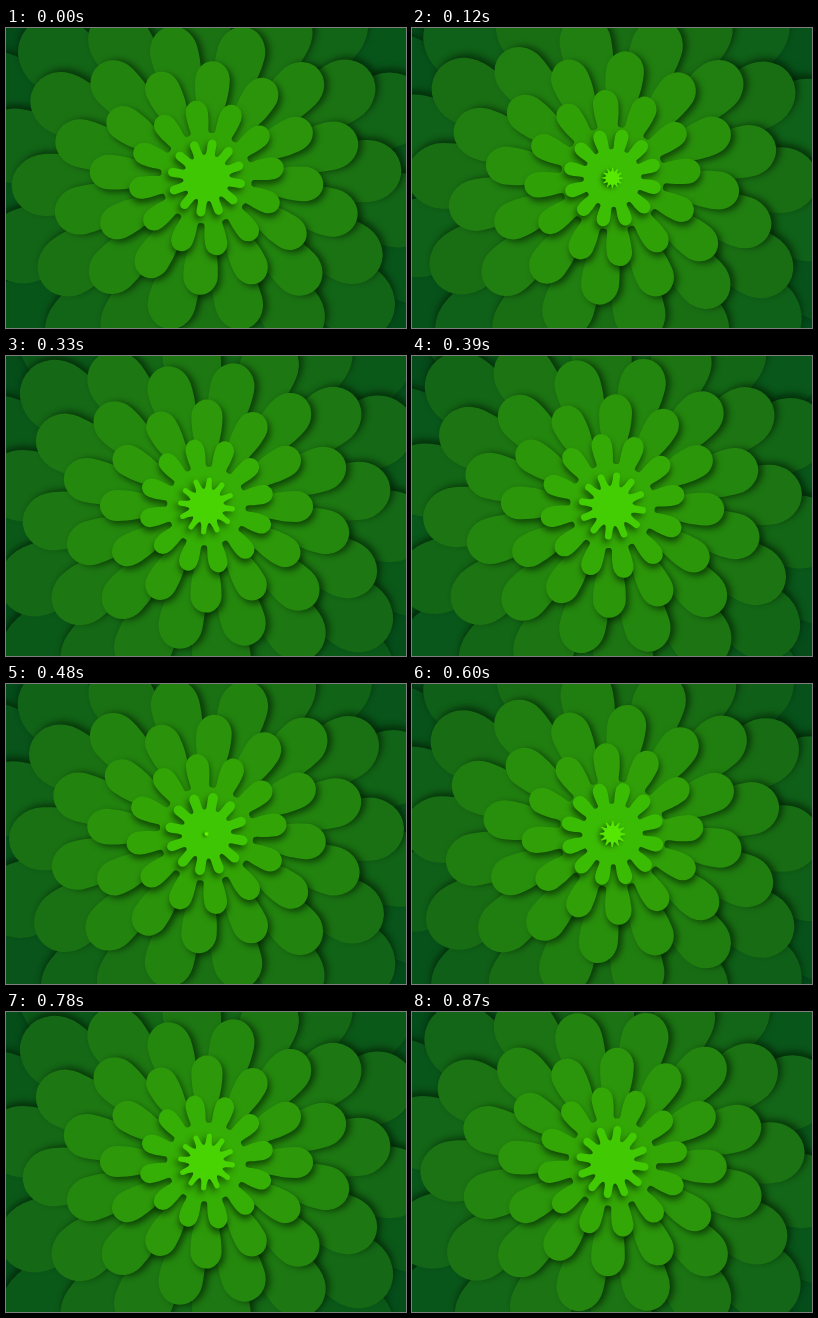
Animation of 400 by 300 pixels, one loop 900 ms. Source, as an HTML page with a canvas:

```html
<!DOCTYPE html>
<html lang="en">
<head>
<meta charset="utf-8">
<title>Blooming flower</title>
<style>
  html, body { margin: 0; width: 100%; height: 100%; overflow: hidden; background: #044b1a; }
  canvas { display: block; width: 400px; height: 300px; }
</style>
</head>
<body>
<canvas id="stage" width="400" height="300"></canvas>
<script>
const ctx = document.getElementById('stage').getContext('2d');
const LOOP = 900, STEP = 30;
const SPAWN = 450;            // ms between two new flowers
const LAYERS = 9, PETALS = 12;
const GROWTH = 39;            // radius gained per spawn interval
const TURN = 12;              // degrees turned per spawn interval
const START = -2.5;           // angle at birth
const rad = deg => deg * Math.PI / 180;

// Colour at age 0, 1, 2 ... spawn intervals
const SHADES = [
  [96, 246, 2], [63, 199, 3], [50, 165, 6], [43, 148, 11], [34, 132, 15],
  [27, 114, 19], [18, 100, 23], [8, 85, 26], [4, 75, 26], [3, 70, 25]
];

function shade(age) {
  const i = Math.min(Math.floor(age), SHADES.length - 2);
  const f = Math.min(age - i, 1);
  const mix = SHADES[i].map((c, n) => Math.round(c + (SHADES[i + 1][n] - c) * f));
  return `rgb(${mix})`;
}

// Young flowers are spiky stars, older ones have round, club-like petals
function flower(r, turn) {
  const half = Math.PI / PETALS;
  const grown = Math.min(1, r / 50);
  const k = r * (0.03 + 0.1 * grown + 0.03 * Math.min(1, r / 200));
  const c = r - k * 1.1;
  const notch = r * (0.64 - 0.06 * grown), bend = 0.075 * r * grown;
  const nx = notch * Math.cos(half), ny = notch * Math.sin(half);
  const bx = nx + bend * Math.sin(half), by = ny - bend * Math.cos(half);
  const sx = c - r * (0.1 + 0.12 * grown);
  const path = new Path2D();
  for (let i = 0; i < PETALS; i++) {
    const a = turn + i * 2 * half, cos = Math.cos(a), sin = Math.sin(a);
    const at = (x, y) => [x * cos - y * sin, x * sin + y * cos];
    if (i === 0) path.moveTo(...at(nx, -ny));
    path.bezierCurveTo(...at(bx, -by), ...at(sx, -k), ...at(c, -k));
    path.ellipse(...at(c, 0), k * 1.1, k, a, -Math.PI / 2, Math.PI / 2);
    path.bezierCurveTo(...at(sx, k), ...at(bx, by), ...at(nx, ny));
  }
  path.closePath();
  return path;
}

// The shadow swings round from lower left to upper right as a flower ages
function castShadow(age, r) {
  const depth = Math.min(1, 0.3 + r / 30), dir = rad(160 - 40 * age);
  ctx.shadowColor = 'rgba(0, 25, 0, 0.6)';
  ctx.shadowBlur = 6 * depth;
  ctx.shadowOffsetX = 4.5 * depth * Math.cos(dir);
  ctx.shadowOffsetY = 4.5 * depth * Math.sin(dir);
}

function draw(time) {
  const phase = (time % SPAWN) / SPAWN;
  ctx.setTransform(1, 0, 0, 1, 0, 0);
  ctx.shadowColor = 'transparent';
  ctx.fillStyle = shade(LAYERS);
  ctx.fillRect(0, 0, 400, 300);
  ctx.translate(200.5, 150);
  for (let i = LAYERS - 1; i >= 0; i--) {
    const age = i + phase;
    if (age === 0) continue;
    const r = age * GROWTH;
    castShadow(age, r);
    ctx.fillStyle = shade(age);
    ctx.fill(flower(r, rad(START + TURN * age)));
  }
}

const begin = performance.now();
function tick() {
  const t = Math.max(0, performance.now() - begin) % LOOP;
  draw(Math.floor(t / STEP) * STEP);
  requestAnimationFrame(tick);
}
tick();
</script>
</body>
</html>
```
